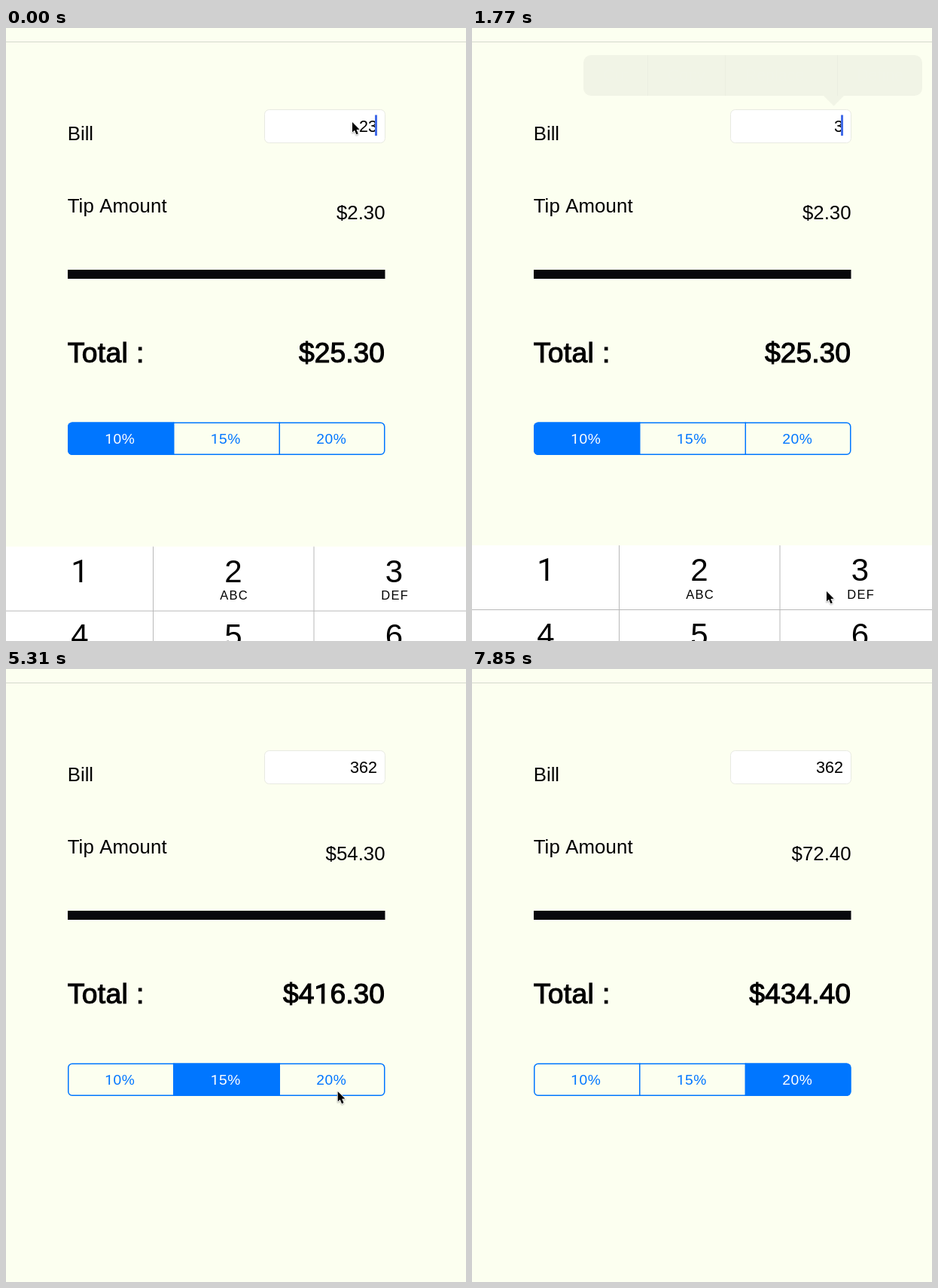
Recreate the animation shown at these times as an HTML page with a canvas. Size 611 by 814 pixels, loop 8.3 s.

```html
<!DOCTYPE html>
<html lang="en">
<head>
<meta charset="utf-8">
<title>Tip calculator</title>
<style>
html, body { margin: 0; width: 100%; height: 100%; overflow: hidden; background: #fcfff0; }
canvas { display: block; }
</style>
</head>
<body>
<canvas id="stage" width="611" height="814"></canvas>
<script>
const ctx = document.getElementById('stage').getContext('2d');
const LOOP = 8300, STEP = 147.7;
const BLUE = '#0076ff', HANDLE = '#0670e4', LINE = '#b9b9b9';

// Pointer moves, in steps
const MOVES = [
  { from: 1, to: 3, x: 463, y: 533 },   // leave the field
  { from: 3, to: 6, x: 468, y: 707 },
  { from: 7, to: 9, x: 471, y: 748 },   // key 3
  { from: 12, to: 14, x: 488, y: 792 }, // key 6
  { from: 15, to: 18, x: 326, y: 757 }, // key 2
  { from: 21, to: 24, x: 338, y: 640 }, // blank area
  { from: 25, to: 31, x: 283, y: 543 }, // 15%
  { from: 32, to: 37, x: 459, y: 563 }, // 20%
  { from: 40, to: 45, x: 130, y: 540 }, // 10%
  { from: 47, to: 49, x: 402, y: 659 },
  { from: 50, to: 52, x: 531, y: 799 }
];

const clamp = u => Math.min(1, Math.max(0, u));
const ease = u => (u = clamp(u), u * u * (3 - 2 * u));

function pointerAt(step) {
  let x = 460, y = 125;
  for (const m of MOVES) {
    const u = ease((step - m.from) / (m.to - m.from));
    x += (m.x - x) * u;
    y += (m.y - y) * u;
  }
  return [x, y];
}

function rect(x, y, w, h, color) {
  ctx.fillStyle = color;
  ctx.fillRect(x, y, w, h);
}

function roundRect(x, y, w, h, r) {
  ctx.beginPath();
  ctx.roundRect(x, y, w, h, r);
}

function dot(x, y, r, color) {
  ctx.fillStyle = color;
  ctx.beginPath();
  ctx.arc(x, y, r, 0, 7);
  ctx.fill();
}

// align: 0 = left, 0.5 = centre, 1 = right; the digit 1 uses a face without a foot
function text(str, x, y, size, { align = 0, color = '#000', gap = 0, heavy = 0 } = {}) {
  const setFont = run => {
    ctx.font = `${size}px ${run === '1' ? 'Roboto' : '"Liberation Sans"'}, sans-serif`;
  };
  ctx.letterSpacing = gap + 'px';
  const runs = str.split(/(1)/);
  const widths = runs.map(run => (setFont(run), ctx.measureText(run).width));
  x -= align * (widths.reduce((a, b) => a + b) - gap);
  ctx.fillStyle = ctx.strokeStyle = color;
  ctx.lineWidth = heavy;
  runs.forEach((run, i) => {
    setFont(run);
    ctx.fillText(run, x, y);
    if (heavy) ctx.strokeText(run, x, y);
    x += widths[i];
  });
}

function drawField(value, selected, caret) {
  roundRect(343.5, 108.5, 160, 44, 6);
  ctx.fillStyle = '#fff';
  ctx.fill();
  ctx.strokeStyle = '#e8eae2';
  ctx.lineWidth = 1;
  ctx.stroke();
  if (selected) rect(468, 116, 25, 27, '#cbdbef');
  text(value, 493, 137.5, 21.6, { align: 1 });
  if (selected) {
    rect(468, 109, 2, 34, HANDLE);
    rect(492, 116, 2, 35, HANDLE);
    dot(469, 109, 8, HANDLE);
    dot(493, 151.5, 8, HANDLE);
  }
  if (caret) rect(490, 115.5, 3, 27.5, '#426be8');
}

function drawMenu(alpha) {
  ctx.globalAlpha = alpha;
  ctx.fillStyle = '#292929';
  roundRect(148, 36, 450, 54, 10);
  ctx.moveTo(467, 90);
  ctx.lineTo(480.5, 103.5);
  ctx.lineTo(494, 90);
  ctx.fill();
  let left = 148;
  for (const [label, right] of [['Cut', 233], ['Copy', 336], ['Replace...', 485], ['Define', 598]]) {
    text(label, (left + right) / 2 + .5, 69.5, 21.5, { align: .5, color: '#fff' });
    if (right < 598) rect(right, 36, 1, 54, '#8c8c8a');
    left = right;
  }
  ctx.globalAlpha = 1;
}

function drawSegments(chosen, pressed) {
  const width = 140.5;
  ctx.save();
  roundRect(82, 523.5, 421.5, 43.5, 6);
  ctx.clip();
  for (let i = 0; i < 3; i++) {
    const x = 82 + i * width;
    ctx.globalAlpha = i === chosen ? 1 : i === pressed ? .2 : 0;
    rect(x, 523, width + .5, 45, BLUE);
    ctx.globalAlpha = 1;
    if (i) rect(x - .5, 523, 1.5, 45, BLUE);
    text(`${10 + 5 * i}%`, x + 69, 552, 19.2, { align: .5, gap: .6, color: i === chosen ? '#fff' : BLUE });
  }
  ctx.restore();
  ctx.strokeStyle = BLUE;
  ctx.lineWidth = 1.5;
  roundRect(82.75, 524.25, 420, 42, 5);
  ctx.stroke();
}

function drawKeyboard(drop, pressedKey) {
  const top = 687 + drop;
  rect(0, top, 611, 140, '#fff');
  ['', 'ABC', 'DEF'].forEach((letters, i) => {
    const left = 195.5 + (i - 1) * 213.5, x = left + 106.5 - (i ? 0 : 7);
    const center = i ? x : 98;
    if (pressedKey === i + 1) rect(left, top, 213.5, 85, '#d2d5db');
    rect(left - .5, top, 1, 140, LINE);
    text(String(i + 1), center, top + 47, 42, { align: .5 });
    text(String(i + 4), center, top + 132.5, 42, { align: .5 });
    text(letters, center + .5, top + 70.5, 16.5, { align: .5, gap: 1.3 });
  });
  rect(0, top + 85, 611, 1, LINE);
}

function drawPointer(x, y) {
  ctx.save();
  ctx.translate(x, y);
  const arrow = new Path2D('M0 0V13.5L3 10.8 5.4 16.3 7.8 15.2 5.5 9.9 9.6 9.7Z');
  ctx.lineJoin = 'round';
  ctx.lineWidth = 1.6;
  ctx.strokeStyle = '#fff';
  ctx.shadowColor = 'rgba(0,0,0,.35)';
  ctx.shadowBlur = 2;
  ctx.shadowOffsetY = 1;
  ctx.stroke(arrow);
  ctx.shadowColor = 'transparent';
  ctx.fillStyle = '#000';
  ctx.fill(arrow);
  ctx.restore();
}

function draw(step) {
  const typed = step < 11 ? '23' : step < 15 ? '3' : step < 19 ? '36' : '362';
  const chosen = step < 33 ? 0 : step < 40 ? 1 : 2;
  const pressedSegment = step === 32 ? 1 : step === 39 ? 2 : -1;
  const pressedKey = step === 11 ? 3 : step === 19 ? 2 : 0;
  const selected = step >= 1 && step < 11;
  const bill = step < 25 ? 23 : 362;
  const tip = bill * (.1 + .05 * chosen);
  const money = v => '$' + v.toFixed(2);
  const menuAlpha = step < 11 ? clamp(step / 2) : clamp(.6 - .55 * (step - 11));
  const drop = 1.6 * clamp(1 - step) + 130 * ease((step - 24) / 4);

  rect(0, 0, 611, 814, '#fcfff0');
  rect(0, 18, 611, 1, '#d5d8cd');
  text('Bill', 81.7, 149.3, 25.8);
  text('Tip Amount', 81.7, 245, 25.8, { gap: .1 });
  text(money(tip), 503.5, 254.3, 25.8, { align: 1 });
  rect(82, 321, 421.5, 12, '#08080c');
  text('Total :', 81.7, 444, 37.3, { gap: .35, heavy: 1.1 });
  text(money(bill + tip), 503, 444, 37.3, { align: 1, heavy: 1.1 });
  drawSegments(chosen, pressedSegment);
  drawField(typed, selected, !selected && step < 25);
  drawMenu(menuAlpha);
  drawKeyboard(drop, pressedKey);
  if (step < 53) drawPointer(...pointerAt(step));
}

function loop() {
  draw(Math.floor(performance.now() % LOOP / STEP + .08));
  requestAnimationFrame(loop);
}
loop();
</script>
</body>
</html>
```
